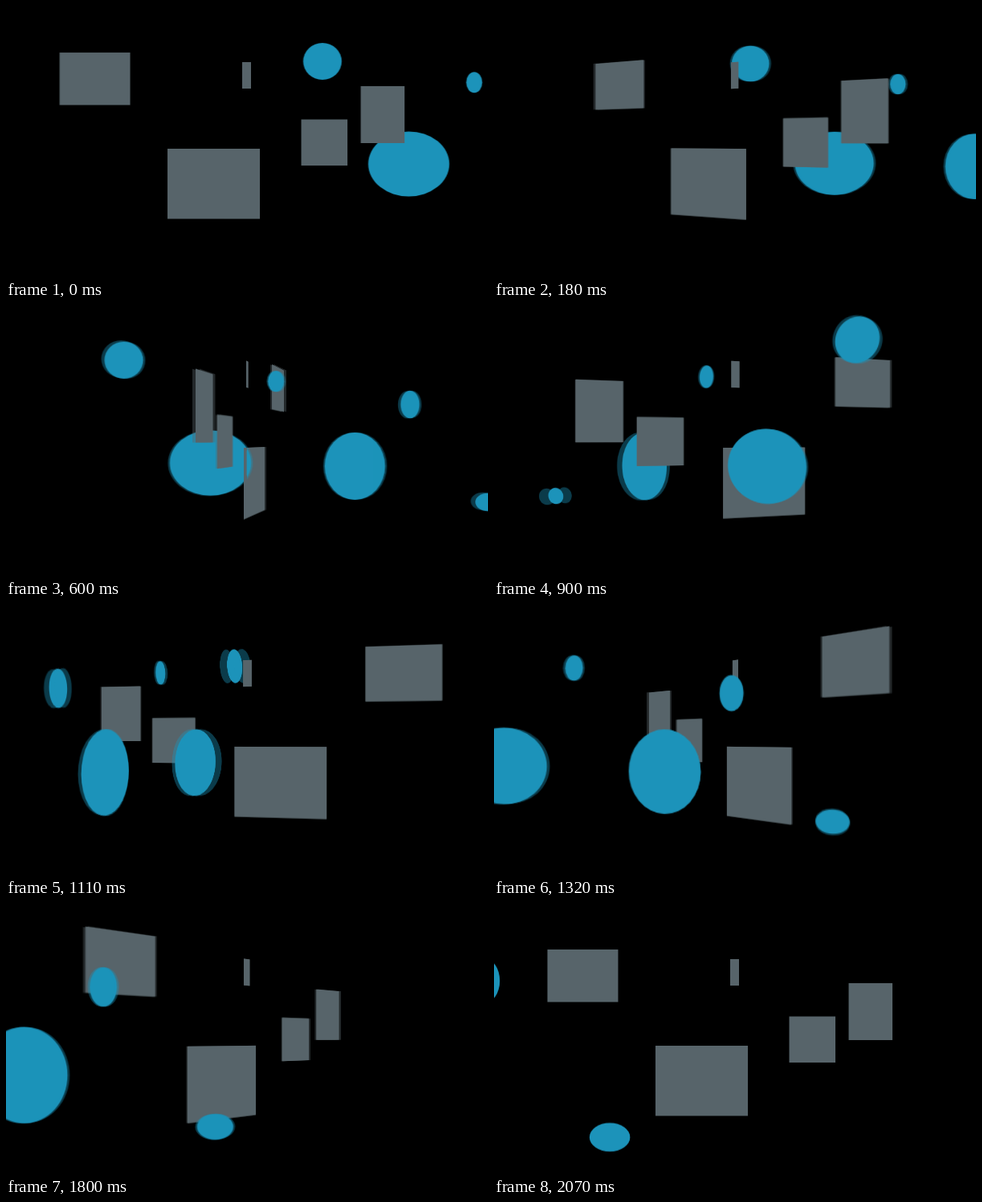
Animation of 600 by 338 pixels, one loop 2100 ms. Source, as an HTML page without scripts:

```html
<!DOCTYPE html>
<html lang="en">
<head>
<meta charset="utf-8">
<title>Turning shapes</title>
<style>
  html, body { margin: 0; width: 100%; height: 100%; overflow: hidden; background: #000; }
  .stage {
    position: relative; width: 600px; height: 338px; overflow: hidden;
    background: #000; perspective: 830px; perspective-origin: 300px 169px;
  }
  .scene { position: absolute; inset: 0; transform-style: preserve-3d; }
  .plane {
    --shift: 0ms;
    position: absolute; left: 0; top: 0; width: 640px; height: 338px;
    animation: 2100ms linear var(--shift) infinite both;
  }
  .plane svg { display: block; width: 640px; height: 338px; }
  .discs { transform-origin: 344px 169px; animation-name: slide, spin; fill: #1c93ba; }
  .cards { transform-origin: 300px 169px; animation-name: turn; fill: #57646a; }

  /* faint copies slightly early and late soften moving edges */
  .early { --shift: -6ms; }
  .late { --shift: 6ms; }
  .early svg, .late svg { animation: ghost 2100ms linear infinite; }

  @keyframes slide {
    0% { translate: 247px 0 0; }
    8.571% { translate: 172.9px 0 -24.5px; }
    17.143% { translate: 98.8px 0 -28px; }
    22.857% { translate: 49.4px 0 -18.7px; }
    28.571% { translate: 0 0 0; }
    42.857% { translate: -83px 0 55px; }
    62.857% { translate: -202px 0 145px; }
    75.714% { translate: -274px 0 201px; }
    98.571%, 100% { translate: -398.5px 0 311px; }
  }
  @keyframes spin {
    0%, 28.571% { rotate: y 0deg; }
    64.286%, 100% { rotate: y 360deg; }
  }
  @keyframes turn {
    0% { rotate: y 0deg; }
    98.571%, 100% { rotate: y -360deg; }
  }
  @keyframes ghost {
    0%, 0.7% { opacity: 0; }
    1.4%, 98% { opacity: .4; }
    98.5%, 100% { opacity: 0; }
  }
</style>
</head>
<body>
<svg width="0" height="0" style="position:absolute" aria-hidden="true">
  <defs>
    <g id="discs">
      <ellipse cx="147.3" cy="69" rx="24" ry="23"/>
      <ellipse cx="254.8" cy="197" rx="50.5" ry="40.5"/>
      <ellipse cx="336.3" cy="95.3" rx="10" ry="13"/>
      <ellipse cx="434.7" cy="201" rx="37.7" ry="42"/>
      <ellipse cx="503.6" cy="124" rx="11.8" ry="17.2"/>
      <ellipse cx="601" cy="246" rx="15.8" ry="11.2"/>
    </g>
    <g id="cards">
      <rect x="66.5" y="58" width="88" height="65.5"/>
      <rect x="294" y="70" width="11" height="33"/>
      <rect x="201" y="178" width="115" height="87.5"/>
      <rect x="367.5" y="141.5" width="57.5" height="57.5"/>
      <rect x="441.5" y="100" width="54.5" height="71"/>
    </g>
  </defs>
</svg>
<div class="stage">
  <div class="scene">
    <div class="plane discs early"><svg><use href="#discs"/></svg></div>
    <div class="plane discs late"><svg><use href="#discs"/></svg></div>
    <div class="plane discs"><svg><use href="#discs"/></svg></div>
    <div class="plane cards early"><svg><use href="#cards"/></svg></div>
    <div class="plane cards late"><svg><use href="#cards"/></svg></div>
    <div class="plane cards"><svg><use href="#cards"/></svg></div>
  </div>
</div>
</body>
</html>
```
